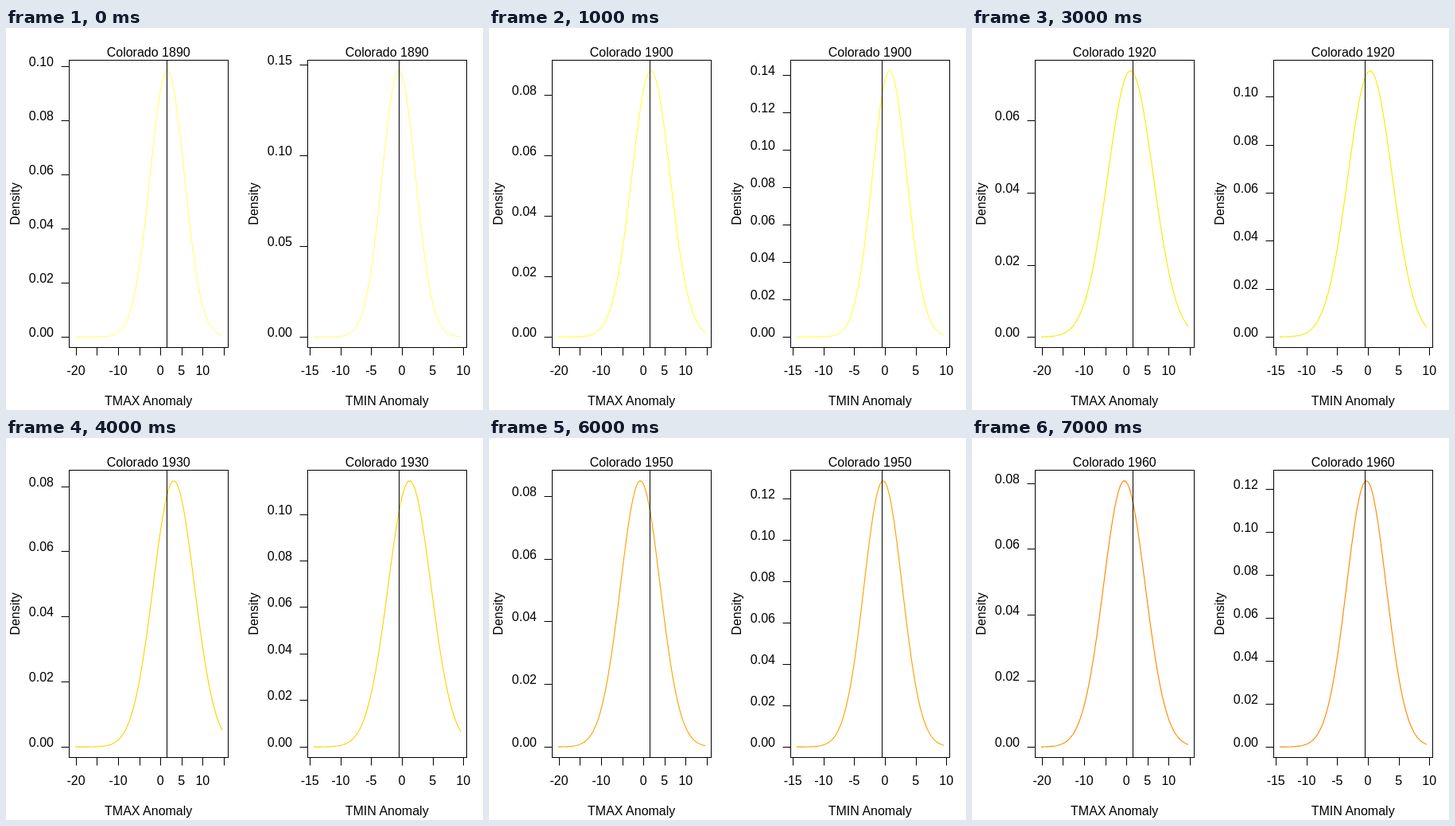
Recreate the animation shown at these times as an HTML page. Size 600x480 px, loop 8000 ms.

```html
<!DOCTYPE html>
<html lang="en">
<head>
<meta charset="utf-8">
<style>
  html, body { margin: 0; width: 100%; height: 100%; overflow: hidden; background: #fff; }
  svg { display: block; }
  text { font: 16px "Liberation Sans", Arial, sans-serif; fill: #000; text-anchor: middle; }
  .tick { text-anchor: end; }
  path, rect { fill: none; stroke: #000; stroke-width: 1; }
</style>
</head>
<body>
<svg id="stage" width="600" height="480" viewBox="0 0 600 480"></svg>
<script>
const STEP_MS = 1000;
const TOP = 40.5, BOTTOM = 401.5, WIDTH = 200;
const PAD = 0.04 / 1.08;
const HIGH = TOP + (BOTTOM - TOP) * PAD;
const LOW = BOTTOM - (BOTTOM - TOP) * PAD;

// left edge, x of zero, px per unit, reference line, x ticks, labelled ticks
const panels = [
  { name: "TMAX", left: 79.5, zero: 194.6, unit: 5.31, ref: 202.5,
    ticks: [-20, -15, -10, -5, 0, 5, 10, 15], labels: [-20, -10, 0, 5, 10] },
  { name: "TMIN", left: 379.5, zero: 498.4, unit: 7.72, ref: 494.5,
    ticks: [-15, -10, -5, 0, 5, 10], labels: [-15, -10, -5, 0, 5, 10] }
];

// colour, line width, then [mean, deviation, y step] for each panel
const decades = [
  ["#ffff40", 0.85, [1.55, 4.058, 0.02], [-0.55, 2.721, 0.05]],
  ["#ffff18", 1, [1.72, 4.535, 0.02], [0.72, 2.804, 0.02]],
  ["#ffff00", 1.15, [0.05, 5.71, 0.01], [-0.15, 3.61, 0.02]],
  ["#ffe800", 1.15, [0.9, 5.4, 0.02], [0.3, 3.6, 0.02]],
  ["#ffd100", 1.15, [3.1, 4.883, 0.02], [1.2, 3.49, 0.02]],
  ["#ffb900", 1.15, [-1.25, 4.487, 0.02], [-0.38, 3.013, 0.02]],
  ["#ffa200", 1.15, [-0.8, 4.7, 0.02], [-0.35, 3.1, 0.02]],
  ["#ff8b00", 1.15, [-0.55, 4.944, 0.02], [-0.3, 3.22, 0.02]]
];

const stage = document.getElementById("stage");

function add(tag, attrs, text = "", parent = stage) {
  const el = document.createElementNS("http://www.w3.org/2000/svg", tag);
  for (const key in attrs) el.setAttribute(key, attrs[key]);
  el.textContent = text;
  return parent.appendChild(el);
}

const crisp = v => Math.floor(v) + 0.5;

function buildPanel(p) {
  const mid = p.left + WIDTH / 2 - 0.3;
  p.curve = add("path", {});
  p.axis = add("g", {});
  p.title = add("text", { x: mid, y: 36 });
  add("rect", { x: p.left, y: TOP, width: WIDTH, height: BOTTOM - TOP });
  add("path", { d: `M${p.ref} ${TOP}V${BOTTOM}` });
  for (const v of p.ticks) {
    const x = p.zero + v * p.unit;
    add("path", { d: `M${crisp(x)} ${BOTTOM}v10` });
    if (p.labels.includes(v)) add("text", { x: x - 0.4, y: 436 }, v);
  }
  add("text", { x: mid, y: 474 }, p.name + " Anomaly");
  add("text", { transform: `translate(${p.left - 62.5} 221) rotate(-90)` }, "Density");
}

function drawPanel(p, year, color, weight, [mean, sd, step]) {
  const peak = 1 / (sd * Math.sqrt(2 * Math.PI));
  const density = x => peak * Math.exp(-(((x - p.zero) / p.unit - mean) ** 2) / (2 * sd * sd));
  const x0 = p.left + WIDTH * PAD, x1 = p.left + WIDTH * (1 - PAD);
  const floor = Math.min(density(x0), density(x1));
  const yOf = d => LOW - (d - floor) / (peak - floor) * (LOW - HIGH);

  const n = 150, points = [];
  for (let i = 0; i <= n; i++) {
    const x = x0 + (x1 - x0) * i / n;
    points.push(x.toFixed(2) + " " + yOf(density(x)).toFixed(2));
  }
  p.curve.setAttribute("d", "M" + points.join("L"));
  p.curve.style.stroke = color;
  p.curve.style.strokeWidth = weight;
  p.title.textContent = "Colorado " + year;

  p.axis.replaceChildren();
  for (let i = 0; yOf(i * step) >= TOP; i++) {
    const y = crisp(yOf(i * step) + 0.3);
    add("path", { d: `M${p.left} ${y}h-10` }, "", p.axis);
    add("text", { class: "tick", x: p.left - 19.5, y: y - 0.5 }, (i * step).toFixed(2), p.axis);
  }
}

let shown = -1;
function render() {
  const i = Math.floor(performance.now() / STEP_MS) % decades.length;
  if (i !== shown) {
    const [color, weight, ...fits] = decades[i];
    panels.forEach((p, k) => drawPanel(p, 1890 + i * 10, color, weight, fits[k]));
    shown = i;
  }
  requestAnimationFrame(render);
}

panels.forEach(buildPanel);
render();
</script>
</body>
</html>
```
